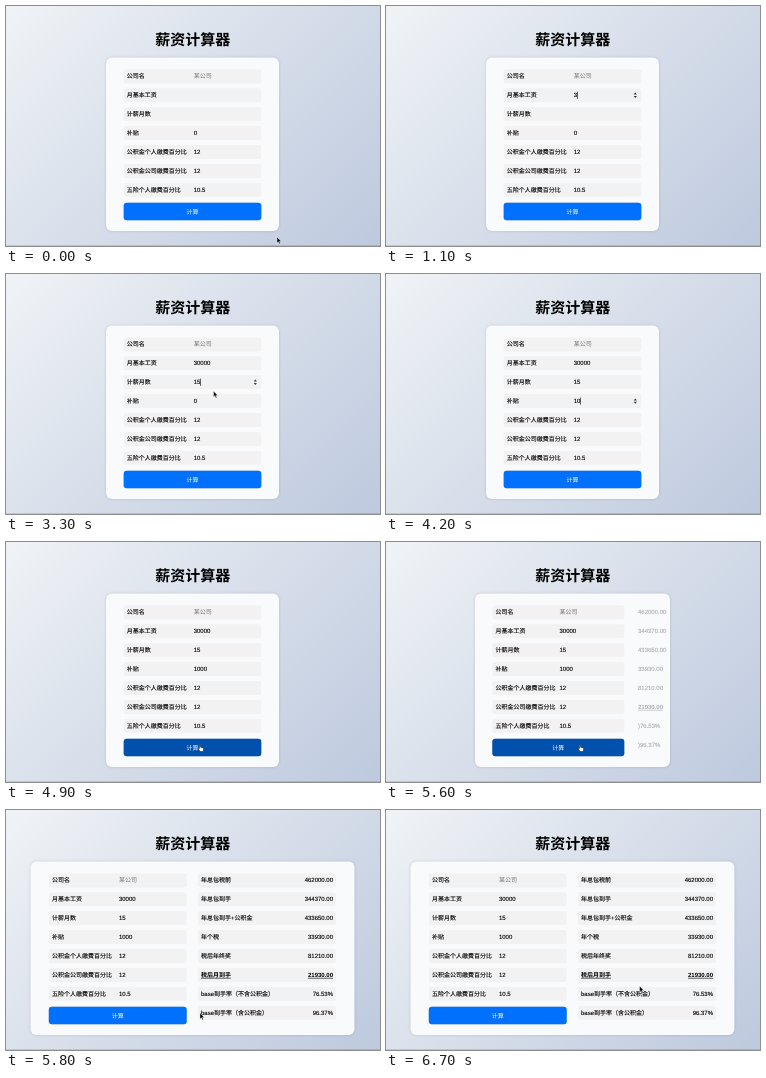
Recreate the animation shown at these times as an HTML page. Size 374 px wide and 240 px high, loop 6800 ms.

```html
<!DOCTYPE html>
<html lang="zh-CN">
<head>
<meta charset="utf-8">
<title>薪资计算器</title>
<style>
html, body { margin: 0; width: 100%; height: 100%; overflow: hidden; }
body { background: linear-gradient(135deg, #f0f3f6, #bdc9de); }
svg { display: block; width: 374px; height: 240px; }
text {
  font: 6px "Liberation Sans", "Noto Sans CJK SC", "Noto Sans CJK", sans-serif;
  text-rendering: geometricPrecision; white-space: pre;
}
.title { font: 700 15px "Noto Sans CJK SC", "Noto Sans CJK", sans-serif; }
.card { fill: #f8fafc; filter: drop-shadow(0 .5px 1.5px rgba(0,0,0,.14)); }
.button { filter: drop-shadow(0 .6px .6px rgba(0,0,0,.25)); }
.field { fill: #f2f2f3; }
.ink { stroke: #000; stroke-width: .12; }
.hint { fill: #707070; }
.end { text-anchor: end; }
.mid { text-anchor: middle; }
.key { font-weight: 700; text-decoration: underline; }
</style>
</head>
<body>
<svg id="stage" viewBox="0 0 374 240"></svg>
<script>
const LOOP = 6800, STEP = 100, TOP = 70.4, PITCH = 18.9;
const svg = document.getElementById('stage');

function set(el, attrs) {
  for (const k in attrs) el.setAttribute(k, attrs[k]);
  return el;
}
function add(tag, attrs, text = '', parent = svg) {
  const el = set(document.createElementNS('http://www.w3.org/2000/svg', tag), attrs);
  el.textContent = text;
  return parent.appendChild(el);
}
const show = (el, on) => set(el, { visibility: on ? 'visible' : 'hidden' });
const rowY = i => TOP + i * PITCH;
const baseline = i => rowY(i) + 1.95;

const fieldData = [
  ['公司名', '某公司'], ['月基本工资', ''], ['计薪月数', ''], ['补贴', '0'],
  ['公积金个人缴费百分比', '12'], ['公积金公司缴费百分比', '12'], ['五险个人缴费百分比', '10.5']
];
const resultData = [
  ['年总包税前', '462000.00'], ['年总包到手', '344370.00'], ['年总包到手+公积金', '433650.00'],
  ['年个税', '33930.00'], ['税后年终奖', '81210.00'], ['税后月到手', '21930.00'],
  ['base到手率（不含公积金）', '76.53%'], ['base到手率（含公积金）', '96.37%']
];

add('rect', { y: 239, width: 374, height: 1, 'fill-opacity': .12 });
add('text', { class: 'title mid', x: 186.8, y: 39.3 }, '薪资计算器');
const card = add('rect', { class: 'card', y: 51.5, height: 173.5, rx: 6 });

const fields = fieldData.map(([label, value], i) => ({
  box: add('rect', { class: 'field', y: rowY(i) - 7, height: 14, rx: 2.5 }),
  label: add('text', { class: 'ink', y: baseline(i) }, label),
  value: add('text', { class: i ? 'ink' : 'hint', y: baseline(i) }, value),
  spin: add('path', { fill: '#333' })
}));

const button = add('rect', { class: 'button', y: 196.7, height: 17.6, rx: 3 });
const buttonText = add('text', { class: 'mid', y: 207.7, fill: '#fff' }, '计算');

const panel = add('g', {});
const results = resultData.map(([label, value], i) => {
  const cls = i === 5 ? 'key' : 'ink';
  return {
    box: add('rect', { class: 'field', y: rowY(i) - 7, height: 14, rx: 2.5 }, '', panel),
    label: add('text', { class: cls, y: baseline(i) }, label, panel),
    value: add('text', { class: cls + ' end', y: baseline(i) }, value, panel)
  };
});

const caret = add('rect', { width: .6, height: 7.2, fill: '#000' });
const pointers = {
  arrow: add('path', { d: 'M0 0V6L1.4 4.7 2.4 7 3.4 6.6 2.4 4.4H4.2Z', fill: '#000', stroke: '#fff', 'stroke-width': .4 }),
  beam: add('path', { d: 'M-1.3-3Q0-3 0-2.4Q0-3 1.3-3M0-2.4V2.4M-1.3 3Q0 3 0 2.4Q0 3 1.3 3', fill: 'none', stroke: '#222', 'stroke-width': .8 }),
  hand: add('path', { d: 'M-.6 0Q0-.7.6 0V2.3L3.2 2.9Q3.8 3.1 3.7 4L3.2 6.6H.2L-1.9 3.9Q-1.9 3-.6 3.6Z', fill: '#fff', stroke: '#222', 'stroke-width': .6 })
};

// [time, x, y] of the pointer
const path = [
  [0, 271, 231], [700, 213, 90], [1600, 213, 90], [2200, 210, 107], [3100, 210, 107],
  [3500, 205, 127], [4600, 205, 127], [4900, 194, 203], [5800, 194, 203],
  [6500, 253, 180], [6700, 253.6, 176]
];
// [time, card left, card right, fields left, right, results left, right, results opacity]
const layout = [
  [5500, 100, 273, 117.7, 255.3, 249, 284, 0],
  [5600, 89, 284, 106.3, 238.3, 249, 284, .3],
  [5700, 42, 331, 60, 191, 203, 313, .75],
  [5800, 24.5, 348.5, 42.8, 180.7, 192, 330, 1]
];
const typing = [[1000, 1600], [2500, 3100], [3800, 4600]];
const focusTimes = [[4900, -1], [3600, 3], [2200, 2], [800, 1]];
const keystrokes = {
  1: [[1400, '30000'], [1300, '3000'], [1200, '30'], [1000, '3'], [0, '']],
  2: [[2700, '15'], [2500, '1'], [0, '']],
  3: [[4400, '1000'], [4300, '100'], [4200, '10'], [3900, '1'], [3800, ''], [0, '0']]
};

const latest = (list, t, none) => (list.find(([at]) => t >= at) || [0, none])[1];

function between(keys, t, ease = u => u) {
  const i = keys.findIndex(k => k[0] > t);
  if (i === 0) return keys[0].slice(1);
  if (i < 0) return keys[keys.length - 1].slice(1);
  const a = keys[i - 1], b = keys[i], u = ease((t - a[0]) / (b[0] - a[0]));
  return a.slice(1).map((v, j) => v + (b[j + 1] - v) * u);
}
const smooth = u => u * u * (3 - 2 * u);

function draw(t) {
  const [cardL, cardR, left, right, resL, resR, alpha] = between(layout, t);
  const [px, py] = between(path, t, smooth);
  const valueX = left + (right - left) / 2 + 1.2;
  const hidden = typing.some(([a, b]) => t >= a && t < b);
  const focus = latest(focusTimes, t, -1);
  const onField = px > left && px < right;
  const hover = onField && !hidden ? fields.findIndex((f, i) => Math.abs(py - rowY(i)) < 7) : -1;
  const onButton = onField && py > 197 && py < 214;

  set(card, { x: cardL, width: cardR - cardL });
  fields.forEach((f, i) => {
    set(f.box, { x: left, width: right - left });
    set(f.label, { x: left + 3.1 });
    set(f.value, { x: valueX });
    if (keystrokes[i]) f.value.textContent = latest(keystrokes[i], t, '');
    const x = right - 6, y = rowY(i);
    set(f.spin, { d: `M${x - 1.6} ${y - .7}h3.2l-1.6-2zM${x - 1.6} ${y + .7}h3.2l-1.6 2z` });
    show(f.spin, i > 0 && (i === focus || i === hover));
  });

  set(button, { x: left, width: right - left, fill: onButton ? '#0050ad' : '#0070ff' });
  set(buttonText, { x: (left + right) / 2 });

  // While narrow, only the values fit and they sit at the left edge.
  const narrow = resR - resL < 60;
  set(panel, { opacity: alpha });
  results.forEach((r, i) => {
    set(r.box, { x: resL, width: resR - resL });
    set(r.label, { x: resL + 3 });
    set(r.value, { x: narrow ? resL + 3 : resR - 3 });
    r.value.style.textAnchor = narrow ? 'start' : 'end';
    r.value.textContent = (narrow && i > 5 ? ')' : '') + resultData[i][1];
    show(r.box, !narrow);
    show(r.label, !narrow);
  });

  show(caret, focus > 0);
  if (focus > 0) {
    const text = fields[focus].value;
    const w = text.textContent ? text.getComputedTextLength() : 0;
    set(caret, { x: valueX + w, y: rowY(focus) - 3.6 });
  }

  const kind = onButton ? 'hand' : hover >= 0 ? 'beam' : 'arrow';
  for (const k in pointers) {
    set(pointers[k], { transform: `translate(${px} ${py})` });
    show(pointers[k], k === kind && !hidden);
  }
}

const start = performance.now();
function tick() {
  const t = (performance.now() - start) % LOOP;
  draw(Math.floor(t / STEP) * STEP);
  requestAnimationFrame(tick);
}
tick();
</script>
</body>
</html>
```
